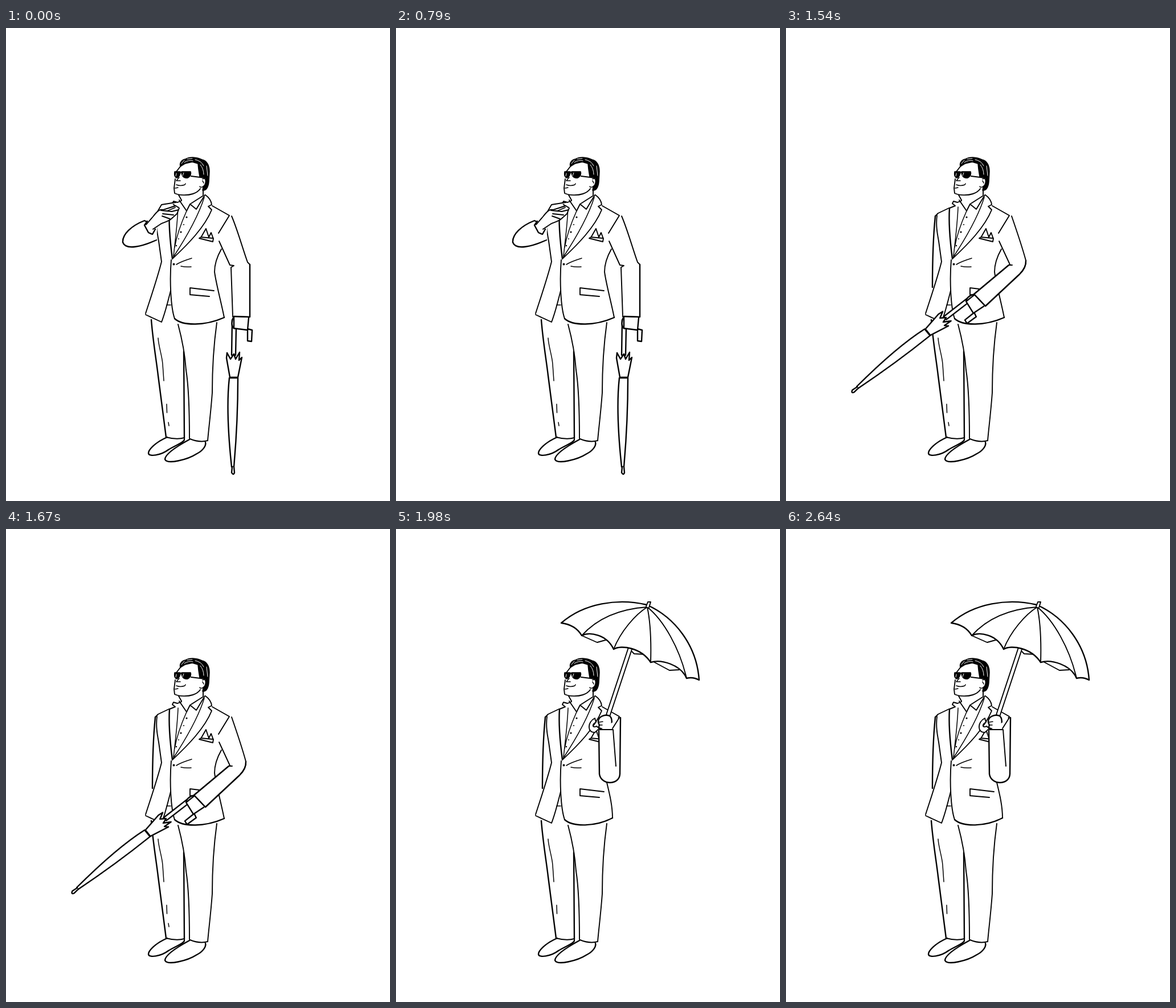
These frames come from a looping animation (674x830 px, 3080 ms). An HTML page:

```html
<!DOCTYPE html>
<html lang="en">
<head>
<meta charset="utf-8">
<title>Man with umbrella</title>
<style>
  html, body { margin: 0; width: 100%; height: 100%; overflow: hidden; background: #fff; }
  svg { display: block; width: 100%; height: 100%; fill: none; stroke: #000; stroke-width: 1.9; stroke-linecap: round; stroke-linejoin: round; }
  .paper { fill: #fff; }
  .bold { stroke-width: 2.4; }
  .fine { stroke-width: 1.5; }
  .ink { fill: #000; }
  .shine { stroke: #fff; stroke-width: 1; }
</style>
</head>
<body>
<svg viewBox="0 0 674 830">
  <!-- Legs and shoes -->
  <path class="bold" d="M255 512 C258 550 264 584 267 610 L281 718"/>
  <path class="bold" d="M312 568 L313 720"/>
  <path d="M302 520 C309 546 314 570 316 600 C320 625 322 670 322 720 M370 517 C364 560 362 610 362 640 C359 680 356 700 354 724"/>
  <path d="M281 718 Q300 723 313 719 M323 721 Q340 728 354 724"/>
  <path class="fine" d="M267 544 C268 560 274 575 275 590 L277 619 M282 660 L282.500 675"/>
  <path class="fine" data-on="0 1 2" d="M285 692 L286 698"/>
  <path class="bold" d="M283 718 C262 727 250 740 250 746 C250 753 272 750 285 740 C300 731 313 727 313 722"/>
  <path class="bold" d="M322 722 C300 734 279 748 279 757 C283 766 318 758 335 747 C345 742 352 733 350 727"/>

  <!-- Jacket -->
  <path d="M265 329 C263 345 265 358 268 374 L273 410 C266 438 255 470 245 501 M245 503 L273 516 C280 498 284 480 289 461"/>
  <path class="fine" d="M282 486 L289 486"/>
  <path d="M290 407 C287 442 289 490 296 510"/>
  <path class="bold" data-on="0 1 2" d="M296 510 C310 523 350 523 383 508"/>
  <path class="bold" data-on="3 4" d="M296 510 C310 523 350 523 380 507"/>
  <path data-on="0 1 2" d="M378 388 C370 402 366 415 366 428 C369 450 377 478 383 508"/>
  <path data-on="3 4" d="M366 428 C372 455 380 480 380 507"/>
  <path d="M362 312 L392 329 L373 360"/>
  <path d="M323 456 L365 461 M323 456 V468 L357 471"/>
  <path class="fine" d="M299 415 C307 410 316 407 326 404 M307 418 Q316 420 325 419"/>
  <circle class="ink" cx="294.500" cy="414.500" r="1"/>
  <path d="M339 369 L363 375 L364 369 L342 367 Z M343 366 L351 352 L356 367 L360 359 L364 370"/>

  <!-- Lapels and shirt -->
  <path d="M308 303 L301 306 L294 304 L292 308 L297 312 L287 316"/>
  <path class="bold" d="M287 316 C285 345 289 382 292 405"/>
  <path d="M350 293 Q360 300 361 310 L355 313 L361 319 C349 349 320 379 292 405"/>
  <path class="fine" d="M302 314 C301 340 297 375 294 400 M348 297 C339 326 318 365 293 403 M317 321 C308 341 300 362 296 385"/>
  <path d="M304 302 L317 321 L323 309 L334 318 L349 293 M323 309 L345 295"/>
  <g class="ink" stroke="none">
    <circle cx="317" cy="332" r="1.600"/><circle cx="312" cy="345" r="1"/>
    <circle cx="307" cy="358" r="1.600"/><circle cx="303" cy="370" r="1"/><circle cx="299" cy="382" r="1.200"/>
  </g>

  <!-- Head -->
  <path d="M306 243 L299 252 M297 265 L295 281 L296 290 C304 294 319 294 328 291 Q337 288 341 282 M303 293 L308 302 M346 284 V294"/>
  <path class="fine" d="M304 262 L299 268 L306 268 M299 275 Q306 278 314 275 L315 273 M297 281 L302 280"/>
  <path class="ink fine" d="M306 243 C304 236 309 231 315 230 C324 225 337 227 344 231 C354 233 357 243 357 252 L356 270 C355 280 351 286 345 285 L346 279 L351 271 L350 263 L340 261 L338 248 L337 238 L327 235 L314 238 Z"/>
  <path class="shine" d="M308 238 L313 232 M313 236 Q320 231 328 233 M318 230 L327 229 M332 231 Q343 233 347 242 M341 240 Q347 247 347 257 M352 242 L354 259"/>
  <path class="paper fine" d="M345 265 C352 261 352 274 346 278 Q342 281 340 278 M345 268 L347 272"/>
  <path class="ink fine" d="M296 252 L306 252 C306 257 304 262 300 263 C296 262 295 258 296 252 Z M308 252 L324 252 Q326 259 319 263 C311 264 308 259 308 252 Z M306 254 L309 254"/>
  <path d="M325 260 L349 263"/>
  <path class="shine" d="M299 255 L298 260 M312 254 L310 259"/>

  <!-- Hanging arm -->
  <path class="bold" data-on="1 2 3 4" d="M262 330 C258 370 257 420 257 455"/>
  <path data-on="1 2 3 4" d="M286 316 L267 325 L262 330"/>

  <!-- Hand and furled umbrella, hinged at the band -->
  <g id="furled" class="paper bold">
    <path d="M397 512 L396 574 L403 574 L404 526"/>
    <path d="M393 613 L387 579 L388 570 L394 581 L400 572 L403 581 L410 569 L409 583 L414 578 L407 613 Z"/>
    <path d="M392 614 C388 650 389 705 396 770 L400 770 C404 725 407 670 407 614 Z"/>
    <path d="M397 770 L396 780 Q399 786 401 780 L400 770"/>
    <path d="M424 528 L432 530 L431 550 L424 549 Z M399 508 C395 516 396 524 400 527"/>
    <path d="M400 507 L400 527 L424 530 L426 508"/>
  </g>

  <!-- Straightening the collar -->
  <g data-on="0" class="paper">
    <path class="bold" d="M264 348 L243 338 C220 347 204 362 205 376 C210 391 240 383 264 372"/>
    <path stroke="none" d="M244 342 L267 330 L264 371 L245 376 Z"/>
    <path d="M263 327 L273 310 L298 306"/>
    <path class="bold" d="M248 339 L243 346 L250 359 L257 362 L262 353"/>
    <path d="M246 345 L258 331 C265 322 270 317 276 319 L298 312 L304 316 L300 326 L290 335 C283 341 275 341 270 345 L258 353"/>
    <path d="M272 320 L291 322 L303 319 M275 326 L294 328 M283 321 L297 315 M274 330 L288 335"/>
  </g>

  <!-- Sleeves -->
  <g data-on="0" class="paper">
    <path d="M396 330 C406 353 415 386 424 411 L428 415 L428 507 L398 506 L395 420 L400 417 L393 416 L374 374"/>
    <path class="bold" d="M428 415 L428 507 L398 506"/>
  </g>
  <g data-on="1" class="paper">
    <path d="M396 330 C406 353 415 386 424 415 C416 447 405 479 396 507 L368 499 C376 473 386 443 394 417 L400 416 L400 413 L392 414 L374 374"/>
  </g>
  <g data-on="2" class="paper">
    <path d="M396 330 C405 356 414 382 421 408 Q422 420 410 432 L350 488 L330 467 L391 416 L397 416 M393 415 L374 374"/>
    <path class="bold" fill="none" d="M421 408 Q422 420 410 432 L350 488 L330 467 L391 416"/>
  </g>
  <g data-on="3" class="paper">
    <path d="M396 330 C406 355 414 382 419 405 C420 425 416 440 397 433 Q364 414 330 392 L345 358 L404 404"/>
    <path class="bold" fill="none" d="M419 405 C420 425 416 440 397 433 Q364 414 330 392 L345 358 L404 404"/>
  </g>

  <!-- Open umbrella -->
  <g data-on="4" class="paper">
    <path d="M326 187 L353 199 L371 194 M410 211 L418 219 L438 220 M452 233 L480 248 L497 247"/>
    <path d="M409 205 L369 326 L375 329 L416 205"/>
    <path class="bold" d="M290 165 C330 130 390 121 440 133 C490 155 528 205 532 265 Q521 259 510 262 C500 238 465 228 447 234 C430 208 395 203 382 211 C370 185 340 180 326 187 Q315 168 290 165 Z"/>
    <path fill="none" d="M441 137 C395 140 355 155 326 187 M441 137 C420 150 394 180 382 211 M441 137 C447 165 448 200 447 234 M441 137 C470 160 498 210 510 262"/>
    <path d="M439 136 L442 128 L447 128 L444 138"/>
    <path stroke="none" d="M354 340 L378 332 L393 332 L393 430 L357 430 Z"/>
    <path d="M349 332 C335 339 336 358 349 357 L357 350 L352 346 C345 350 343 343 351 339 Z"/>
    <path class="bold" d="M355 348 C360 344 354 341 355 338 C355 328 368 325 375 328 C380 332 379 340 378 351 Q365 354 355 348"/>
    <path class="fine" d="M356 339 L363 338 M356 344 L362 344"/>
    <path class="bold" d="M356 354 L357 430 C360 450 392 450 393 430 L394 331"/>
    <path d="M357 352 L381 352 L386 416 M392 331 L380 350"/>
  </g>
</svg>
<script>
  const LOOP = 3080;
  const poseStarts = [0, 1320, 1540, 1760, 1980];
  const band = { x: 399.5, y: 614 };
  // Place of the band and turn of the furled umbrella in each pose.
  const furledPoses = [
    { x: 399.5, y: 614, turn: 0 },
    { x: 328, y: 599, turn: 21.2 },
    { x: 248, y: 534, turn: 51.2 },
    { x: 256, y: 305, turn: 124.9 },
  ];
  const furled = document.getElementById("furled");
  const parts = document.querySelectorAll("[data-on]");
  let shown = -1;

  function show(pose) {
    for (const part of parts) {
      part.style.display = part.dataset.on.split(" ").includes(String(pose)) ? "" : "none";
    }
    const place = furledPoses[pose];
    furled.style.display = place ? "" : "none";
    if (place) {
      furled.setAttribute("transform",
        `translate(${place.x} ${place.y}) rotate(${place.turn}) translate(${-band.x} ${-band.y})`);
    }
    shown = pose;
  }

  function tick() {
    const time = performance.now() % LOOP;
    const pose = poseStarts.findLastIndex(start => time >= start);
    if (pose !== shown) show(pose);
    requestAnimationFrame(tick);
  }
  tick();
</script>
</body>
</html>
```
